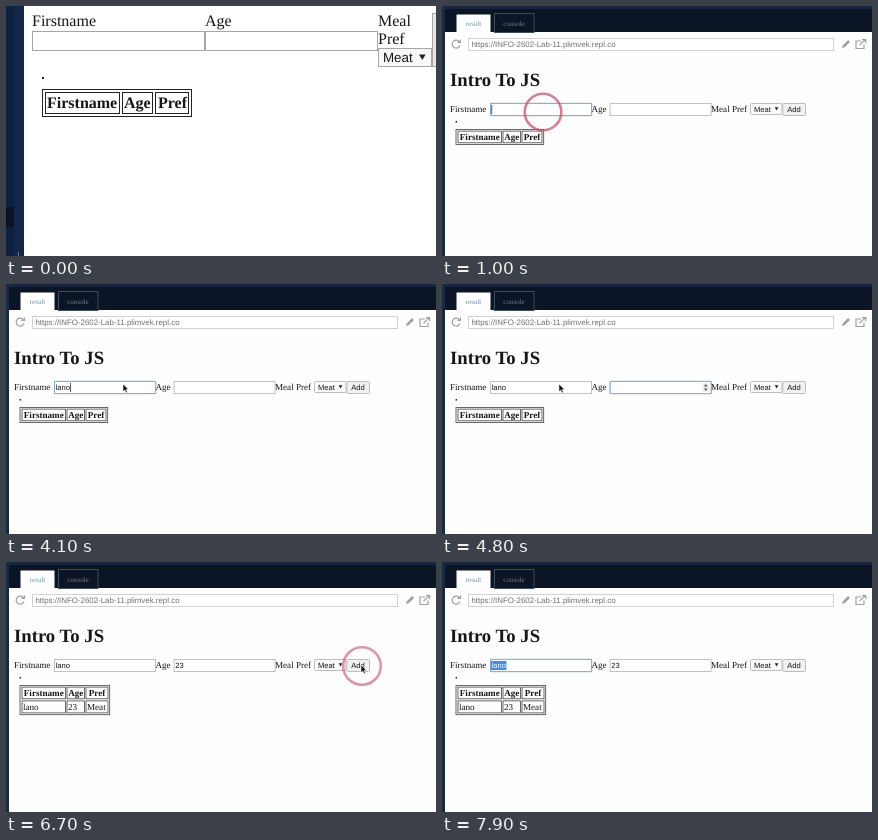
Recreate the animation shown at these times as an HTML page. Size 430 px wide and 250 px high, loop 8 s.

```html
<!DOCTYPE html>
<html lang="en">
<head>
<meta charset="utf-8">
<title>Form demo</title>
<style>
  html, body { margin: 0; width: 100%; height: 100%; overflow: hidden; background: #fff; }
  svg { display: block; width: 430px; height: 250px; }
  text { white-space: pre; fill: #161616; text-rendering: geometricPrecision; }
  .serif { font-family: "Liberation Serif", "Times New Roman", serif; }
  .sans { font-family: "Liberation Sans", Arial, sans-serif; }
  .bold { font-weight: bold; }
</style>
</head>
<body>
<svg id="stage" viewBox="0 0 430 250"></svg>
<script>
const LOOP = 8000, STEP = 100;
const NAME = "lano", AGE = "23";
const stage = document.getElementById("stage");

const rect = (x, y, w, h, fill, stroke = "none", extra = "") =>
  `<rect x="${x}" y="${y}" width="${w}" height="${h}" fill="${fill}" stroke="${stroke}" ${extra}/>`;
const text = (x, y, size, str, cls = "serif", extra = "") =>
  `<text x="${x}" y="${y}" font-size="${size}" class="${cls}" ${extra}>${str}</text>`;
const path = (d, extra) => `<path d="${d}" ${extra}/>`;
const group = (id, body, extra = "") => `<g id="${id}" ${extra}>${body}</g>`;

function closeUp() {
  const cells = [["Firstname", 39.5, 74, 41], ["Age", 116.5, 30, 118], ["Pref", 149.5, 33, 152]];
  return rect(0, 0, 430, 250, "#fff") +
    rect(0, 0, 18, 250, "#14264a") + rect(0, 0, 8, 250, "#10203f") + rect(0, 201, 8, 20, "#0a1426") +
    rect(12, 246, 1, 4, "#6b7890") +
    text(26, 20, 16, "Firstname") + text(199, 20, 16, "Age") +
    text(372, 20, 16, "Meal") + text(372, 38, 16, "Pref") +
    rect(26.5, 25.5, 172, 19, "#fff", "#a6a6a6") + rect(199.5, 25.5, 172, 19, "#fff", "#a6a6a6") +
    rect(372.5, 42.5, 53, 18, "#f8f8f8", "#a6a6a6") + text(377, 56, 13.33, "Meat", "sans") +
    path("M413 48.5h6.6l-3.3 5.5z", 'fill="#222"') +
    rect(426.5, 7.5, 10, 53, "#e6e6e6", "#a6a6a6") +
    rect(36, 71, 2, 2, "#222") +
    rect(36.5, 83.5, 149, 27, "none", "#222") +
    cells.map(([s, x, w, tx]) => rect(x, 86.5, w, 21, "none", "#222") + text(tx, 102, 16, s, "serif bold")).join("");
}

function browserBar() {
  const icon = 'fill="none" stroke="#a0a0a0" stroke-width="1.2"';
  return rect(0, 0, 430, 26, "#0b1525") + rect(0, 0, 430, 3, "#18263d") + rect(0, 0, 3, 250, "#1a2942") +
    rect(14.5, 8.5, 34, 18, "#fff") +
    text(31.5, 20, 7, "result", "serif", 'text-anchor="middle" style="fill:#6a90aa"') +
    rect(52.5, 7.5, 39.5, 19, "none", "#3f4b5f") +
    text(72, 20, 7, "console", "serif", 'text-anchor="middle" style="fill:#6f7c8e"') +
    path("M17.6 36a4 4 0 1 0 .4 3.4M18.4 33.4v3h-3", icon) +
    rect(26.5, 32.5, 365, 12, "#fff", "#d2d2d2") +
    text(29.4, 41, 7.9, "https://INFO-2602-Lab-11.plimvek.repl.co", "sans", 'style="fill:#707070"') +
    path("M400 42l.7-2.6 5.4-5.4 1.9 1.9-5.4 5.4z", 'fill="#a0a0a0"') +
    path("M419 35h-5v7.5h8v-4M417.5 39l6-5.4M420 33.6h3.7v3.7", icon);
}

function form() {
  const field = (x, id) => rect(x + .5, 97.5, 101, 12, "#fff", "#c2c2c2") +
    group(id, rect(x + .5, 97.3, 101.2, 12.4, "none", "#84a9dc", 'rx=".6"'));
  return text(8, 80, 18.7, "Intro To JS", "serif bold") +
    text(8, 106, 9.1, "Firstname") + field(48, "nameFocus") +
    text(149.5, 106, 9.1, "Age") + field(167.6, "ageFocus") +
    group("spinner", rect(260.5, 99, 6.5, 9, "#eee") +
      path("M261.9 102.5h3.8l-1.9-2.5zM261.9 104.4h3.8l-1.9 2.5z", 'fill="#555"')) +
    text(269, 106, 9.1, "Meal Pref") +
    rect(308.5, 97.5, 31.5, 11, "#fafafa", "#bdbdbd", 'rx="1"') + text(312, 106, 7.6, "Meat", "sans") +
    path("M332.7 101.2h3.7l-1.85 3.2z", 'fill="#222"') +
    rect(340.8, 97.5, 22.7, 12, "#f1f1f1", "#bdbdbd", 'rx="1"') + text(345.2, 106, 7.6, "Add", "sans") +
    rect(13.6, 115, 1.4, 1.6, "#222") +
    rect(48.8, 99, 15.6, 9, "#3b8df0", "none", 'id="selection"') +
    text(49.5, 106, 7.6, "", "sans", 'id="nameText"') +
    text(169.2, 106, 7.6, "", "sans", 'id="ageText"') +
    rect(0, 99, .9, 9, "#444", "none", 'id="caret"');
}

function table(id, filled) {
  const last = filled ? 22 : 20;
  const columns = [["Firstname", NAME, 16, 43.5], ["Age", AGE, 61, 17.5], ["Pref", "Meat", 80, last]];
  const line = "#444", thin = 'stroke-width=".8"';
  const cells = columns.map(([head, value, x, w]) =>
    rect(x, 125.1, w, 11.7, "none", line, thin) +
    text(x + w / 2, 134.2, 9.1, head, "serif bold", 'text-anchor="middle"') +
    (filled ? rect(x, 138.9, w, 12, "none", line, thin) + text(x + 1, 148.2, 9.1, value) : ""));
  return group(id, rect(14, 123.4, last + 67.7, filled ? 29.3 : 15.2, "none", line, thin) + cells.join(""));
}

stage.innerHTML =
  group("page", rect(0, 0, 430, 250, "#fefefe") + browserBar() + form() +
    table("emptyTable", false) + table("filledTable", true) +
    '<circle id="ring" fill="none" stroke="#cf4a63" stroke-width="2.6"/>' +
    group("pointer", path("M0 0v7.6l1.8-1.6 1.3 2.8 1.3-.6-1.3-2.7h2.4z",
      'fill="#111" stroke="#fff" stroke-width=".5"'))) +
  group("closeUp", closeUp());

const el = id => document.getElementById(id);
const show = (id, on) => { el(id).style.display = on ? "" : "none"; };
const set = (id, attrs) => { for (const k in attrs) el(id).setAttribute(k, attrs[k]); };
const within = (t, ...spans) => spans.some(([a, b]) => t >= a && t < b);
const typed = (t, str, times) => str.slice(0, times.filter(at => t >= at).length);

// Linear interpolation through [time, x, y] points.
function along(points, t) {
  let i = 0;
  while (i < points.length - 2 && t >= points[i + 1][0]) i++;
  const [a, b] = [points[i], points[i + 1]];
  const k = Math.min(1, Math.max(0, (t - a[0]) / (b[0] - a[0])));
  return [a[1] + (b[1] - a[1]) * k, a[2] + (b[2] - a[2]) * k];
}

const pointerPath = [[4100, 117, 100], [5900, 117, 100], [5901, 264, 101], [6300, 378, 120],
  [6600, 355, 103], [7000, 355, 103], [7400, 150, 105]];
const clicks = [
  { at: 1000, life: 500, path: [[1000, 101, 106], [1500, 101, 106]] },
  { at: 6600, life: 500, path: [[6600, 356, 104], [7100, 356, 104]] },
  { at: 7500, life: 400, path: [[7500, 66, 98], [7800, 24, 92]] }
];

function drawRing(t) {
  const click = clicks.find(c => within(t, [c.at, c.at + c.life]));
  show("ring", click);
  if (!click) return;
  const k = (t - click.at) / click.life;
  const [cx, cy] = along(click.path, t);
  set("ring", { cx, cy, r: 18.3 + 2.5 * k, opacity: .72 * (1 - k) });
}

function draw(t) {
  show("closeUp", t < 200);
  show("nameFocus", within(t, [1000, 4200], [7500, LOOP]));
  show("ageFocus", within(t, [4200, 6600]));
  show("spinner", within(t, [4200, 6600]));

  const name = el("nameText"), age = el("ageText");
  name.textContent = typed(t, NAME, [2700, 3600, 3800, 3900]);
  age.textContent = typed(t, AGE, [5400, 5600]);

  const active = t < 4200 ? name : age;
  show("caret", within(t, [1000, 1500], [2000, 2500], [2700, 3300], [3600, 4800], [5300, 6100]));
  set("caret", { x: +active.getAttribute("x") + active.getComputedTextLength() + (active.textContent ? .2 : -.2) });

  const selected = Math.min(1, Math.max(0, (t - 7500) / 300));
  show("selection", selected > 0);
  set("selection", { x: 64.4 - 15.6 * selected, width: 15.6 * selected });
  name.style.fill = selected === 1 ? "#fff" : "";

  show("emptyTable", t < 6700);
  show("filledTable", t >= 6700);
  drawRing(t);
  show("pointer", within(t, [4100, 5900], [6000, 7400]));
  set("pointer", { transform: `translate(${along(pointerPath, t)})` });
}

const start = performance.now();
function tick() {
  const t = (performance.now() - start) % LOOP;
  draw(Math.floor(t / STEP) * STEP);
  requestAnimationFrame(tick);
}
tick();
</script>
</body>
</html>
```
